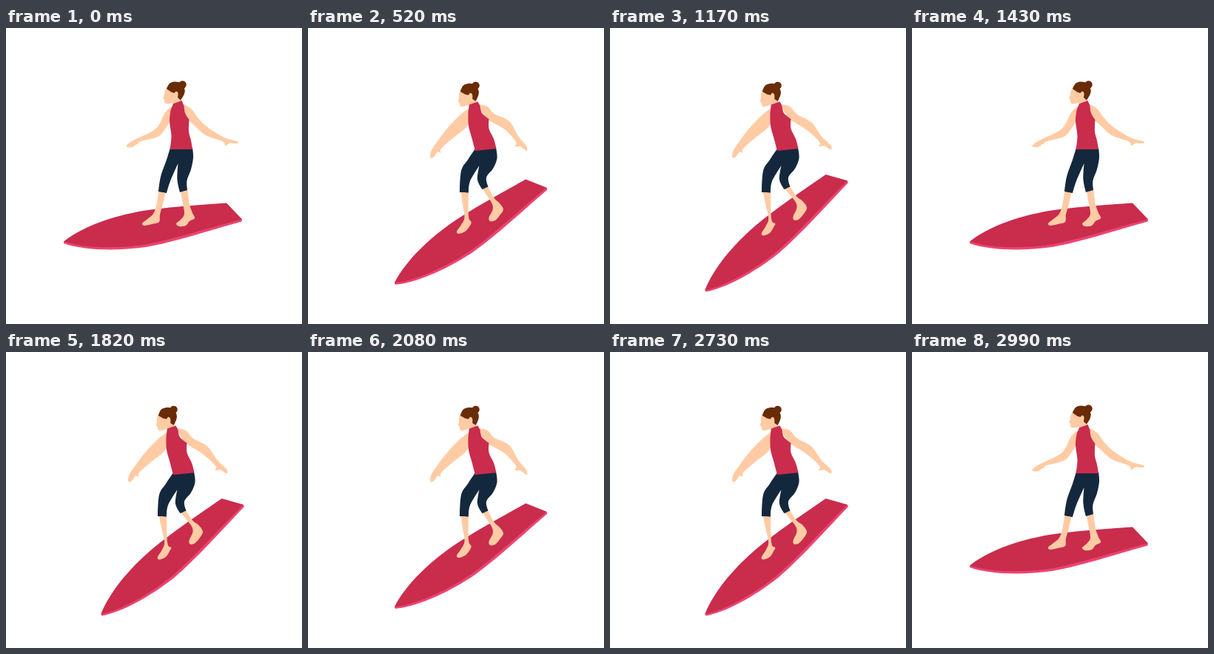
Animation of 400x400 px, one loop 3.12 s. Source, as an HTML page:

```html
<!DOCTYPE html>
<html lang="en">
<head>
<meta charset="utf-8">
<title>Surfer</title>
<style>
html, body { margin: 0; width: 100%; height: 100%; overflow: hidden; background: #fff; }
svg { display: block; width: 100vw; height: 100vh; }
</style>
</head>
<body>
<svg id="stage" viewBox="0 0 400 400"></svg>
<script>
const STEP = 130;
const LAST = 5;
const COLOR = { skin: '#ffcba4', red: '#ca2c4c', edge: '#ec4470', navy: '#14283d', hair: '#6a2b07' };
const rad = deg => deg * Math.PI / 180;

// Each part swings on its own sine; 1 is the crouched pose.
const swing = {
  board: k => 1.336 * Math.sin(rad(32.9 * k)),
  body: k => 1.155 * Math.sin(rad(30 * k)),
  arm: k => 1.035 * Math.sin(rad(26.2 * k))
};

const stage = document.getElementById('stage');
function add(tag, parent, attrs) {
  const el = document.createElementNS('http://www.w3.org/2000/svg', tag);
  for (const name in attrs) el.setAttribute(name, attrs[name]);
  return parent.appendChild(el);
}

// "x,y" is a smooth point, "x,y!" a corner.
const parse = text => text.trim().split(/\s+/).map(word => {
  const [x, y] = word.replace('!', '').split(',').map(Number);
  return { x, y, corner: word.endsWith('!') };
});

const mix = (a, b, p) => a.map((pt, i) => ({
  x: pt.x + (b[i].x - pt.x) * p,
  y: pt.y + (b[i].y - pt.y) * p,
  corner: pt.corner
}));

// Closed spline through the points.
function outline(pts) {
  const n = pts.length;
  const at = i => pts[(i + n) % n];
  const handle = (i, dir) => {
    const p = at(i), s = p.corner ? 0 : dir / 6;
    return [p.x + (at(i + 1).x - at(i - 1).x) * s, p.y + (at(i + 1).y - at(i - 1).y) * s]
      .map(v => v.toFixed(2));
  };
  let d = `M${pts[0].x} ${pts[0].y}`;
  for (let i = 0; i < n; i++) {
    const q = at(i + 1);
    d += `C${handle(i, 1)} ${handle(i + 1, -1)} ${q.x.toFixed(2)},${q.y.toFixed(2)}`;
  }
  return d + 'Z';
}

const shapes = [];
function limb(fill, drive, upright, crouched) {
  shapes.push({ el: add('path', stage, { fill }), drive, a: parse(upright), b: parse(crouched) });
}

const board = add('g', stage);
add('path', board, { fill: COLOR.edge,
  d: 'M78 288.5L78 291C102 300 146 302 189 296C225 290 274 274 318.5 261.5L319 258.5Z' });
add('path', board, { fill: COLOR.red,
  d: 'M78 288.5C104 268 148 252 196 245.5C230 241 264 239 298 236.5L319 258.5C274 270 225 286 189 292.5C146 299 102 297 78 288.5Z' });

// Lower legs
limb(COLOR.skin, swing.board,
  '207,216! 203.5,238 199,251 190,259 184,264 187,267 197,265 207,262 208,252 212,238 217,216!',
  '206,216! 209,238 211.5,256 207,266 201,275 204,278 213,274.5 219,267 220.5,262 217,254 217,216!');
limb(COLOR.skin, swing.board,
  '235,215! 238.5,235 241,251 236,259 230,264.5 234,268 243,267 248,261 255,257 252,250 248,238 245,215!',
  '233,213! 243,228 249,238 249.5,246 244.5,256 246,261 253,260 260,252 264,245 259,237 251,229 241,210!');

// Trousers
limb(COLOR.navy, swing.body,
  '222,162! 217,178 209,201 206,221! 217,223! 222,207 232.5,183! 231.5,205 235,222! 245,219! 244.5,206 250,191 253,175 252,162!',
  '226,163! 216,178 207,193 205,222! 217,222.5! 219,207 231.5,186! 229,205 235.5,218! 243.5,214.5! 241,202 250,190 255.5,176 254,162!');

// Arms
limb(COLOR.skin, swing.body,
  '228,105! 221,108 214,116 206,132 195,141 170,153 162.5,160 170,161 177,156.5! 179.5,161! 180,154 205,147 216,135 225,121!',
  '221,105! 215,110 204,119 188,136 175,153 166.5,166 165.5,175 170,174 175,167! 180.5,169! 180,163 198,147 212,136 221,124!');
limb(COLOR.skin, swing.arm,
  '236,103! 243,104.5 251,110 259,121 271,133 294,147.5 312,153 312.5,156 302,155.5! 295.5,160! 293,153.5 270,145 255,132 244,122!',
  '228,103! 236,104 243,106.5 252,116 272,126 284,146 295,159.5 295.5,166 287.5,160! 278.5,160! 281,154 267,138 252,129 241,123!');

const head = add('g', stage);
const headShape = (fill, text) => add('path', head, { fill, d: outline(parse(text)) });
headShape(COLOR.skin,
  '218,79! 214.5,86 214,90.5 212,95! 213.8,96.5 214,99 215.5,102 220,102.3 225,101! 226.5,106! 239,102! 236,94 236,82!');
headShape(COLOR.hair,
  '217,82! 221,75 228,72.5 237,75 241.5,83 240.5,90 236,97.5! 232,94! 232.5,88 230,85.5 227.5,88! 223,86.5!');
add('circle', head, { cx: 238.5, cy: 76.5, r: 5.2, fill: COLOR.hair });

// Top
limb(COLOR.red, swing.body,
  '226,102.5! 237.5,98! 240.5,105! 242,115 247.5,124! 247,140 250,152 252,164! 221.5,164! 223.5,146 221,126 222.5,111!',
  '218,103.5! 229.5,99.5! 232.5,105! 235,115 244.5,123! 244.5,136 251,150 254.5,163! 226,166! 221.5,149 217,132 216.5,114!');

let shown = -1;
function pose(k) {
  if (k === shown) return;
  shown = k;
  const p = swing.body(k);
  board.setAttribute('transform', `rotate(${-25 * swing.board(k)} 224 229)`);
  head.setAttribute('transform', `translate(${-9 * p} ${2 * p}) rotate(${-7 * p} 232 100)`);
  for (const s of shapes) s.el.setAttribute('d', outline(mix(s.a, s.b, s.drive(k))));
}

const start = performance.now();
function frame() {
  const count = 2 * (LAST + 1);
  const i = Math.floor((performance.now() - start) / STEP) % count;
  pose(i <= LAST ? i : count - 1 - i);
  requestAnimationFrame(frame);
}
pose(0);
requestAnimationFrame(frame);
</script>
</body>
</html>
```
